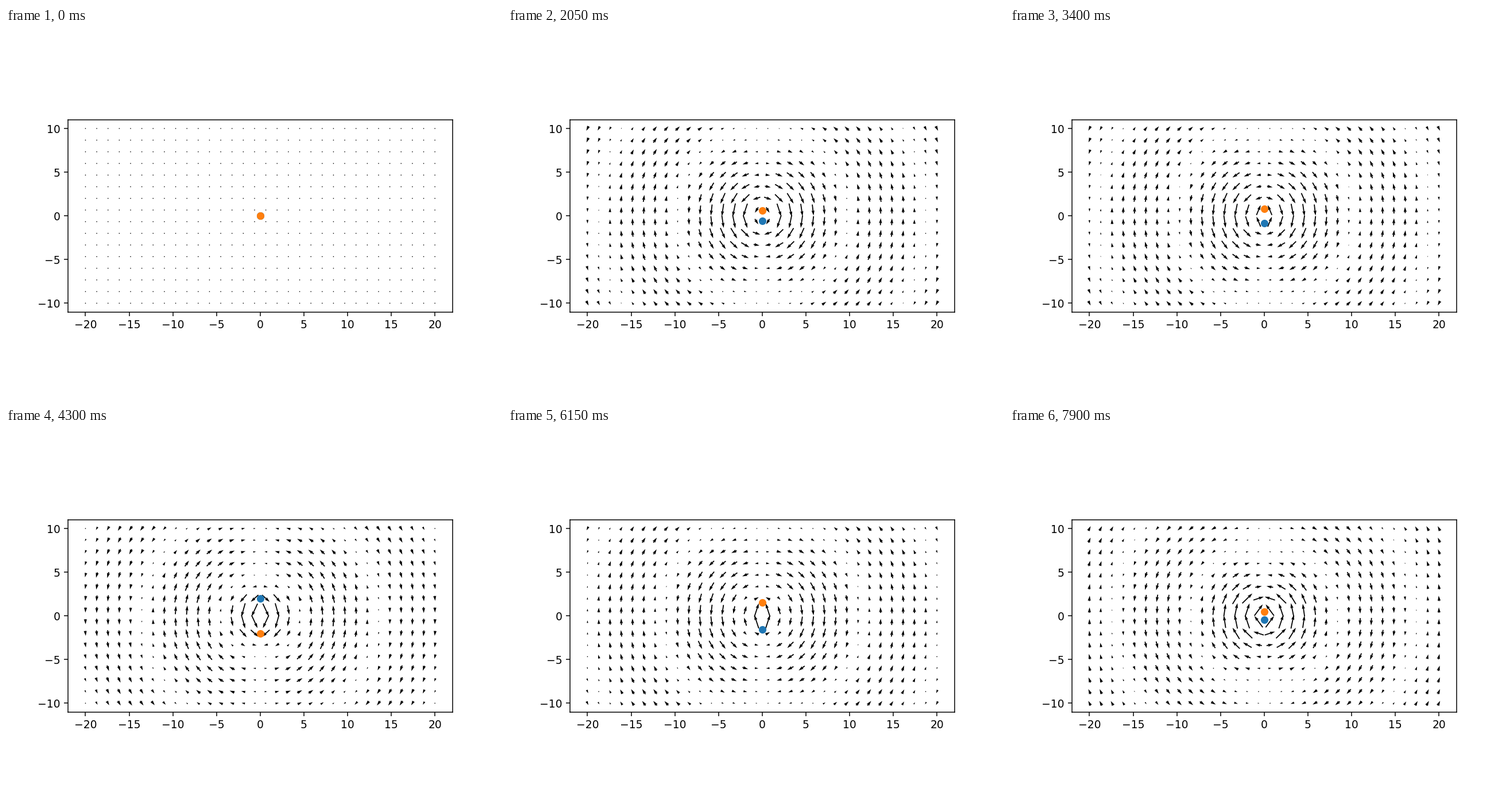
A matplotlib script that plays this animation: 864x648 px, repeating every 7.95 s.

```python
import numpy as np
import matplotlib.pyplot as plt
from matplotlib.animation import FuncAnimation

FRAMES = 159
CYCLES = 6
AMPLITUDE = 2
WAVE_NUMBER = 2 * np.pi / 18
GAIN = 46        # arrow length in pixels for unit field strength
MAX_LENGTH = 24.5

plt.rcParams["font.family"] = "DejaVu Sans"

x, y = np.meshgrid(np.linspace(-20, 20, 32), np.linspace(-10, 10, 16))
r = np.hypot(x, y)


def charge_height(phase):
    return AMPLITUDE * np.sin(phase)


def field(phase):
    """Retarded radiation field of two opposite oscillating charges."""
    retarded = phase - WAVE_NUMBER * r
    strength = np.where(retarded > 0, np.sin(retarded), 0) / (2 * r**3)
    u, v = np.zeros_like(x), np.zeros_like(x)
    for height in (charge_height(phase), -charge_height(phase)):
        dy = y - height
        weight = 1 + 1.7 / (x**2 + dy**2)
        u += strength * weight * x * dy
        v -= strength * weight * x**2
    return u, v


def arrows(phase):
    """Compress the field strength so near and far arrows stay readable."""
    u, v = field(phase)
    size = np.hypot(u, v)
    length = np.minimum(GAIN * np.sqrt(size), MAX_LENGTH)
    scale = length / np.maximum(size, 1e-12)
    return u * scale, v * scale


fig, ax = plt.subplots(figsize=(6.4, 4.8), dpi=135)
ax.set_aspect("equal")
ax.set_xlim(-22, 22)
ax.set_ylim(-11, 11)
ax.set_xticks(range(-20, 21, 5))
ax.set_yticks(range(-10, 11, 5))

quiver = ax.quiver(x, y, *arrows(0), pivot="mid", scale_units="dots", scale=1)
blue, = ax.plot([0], [0], "o", color="tab:blue")
orange, = ax.plot([0], [0], "o", color="tab:orange")


def update(i):
    phase = 2 * np.pi * CYCLES * i / FRAMES
    quiver.set_UVC(*arrows(phase))
    blue.set_ydata([charge_height(phase)])
    orange.set_ydata([-charge_height(phase)])
    return quiver, blue, orange


anim = FuncAnimation(fig, update, frames=FRAMES, interval=50,
                     repeat=True, repeat_delay=0)
plt.show()
```
